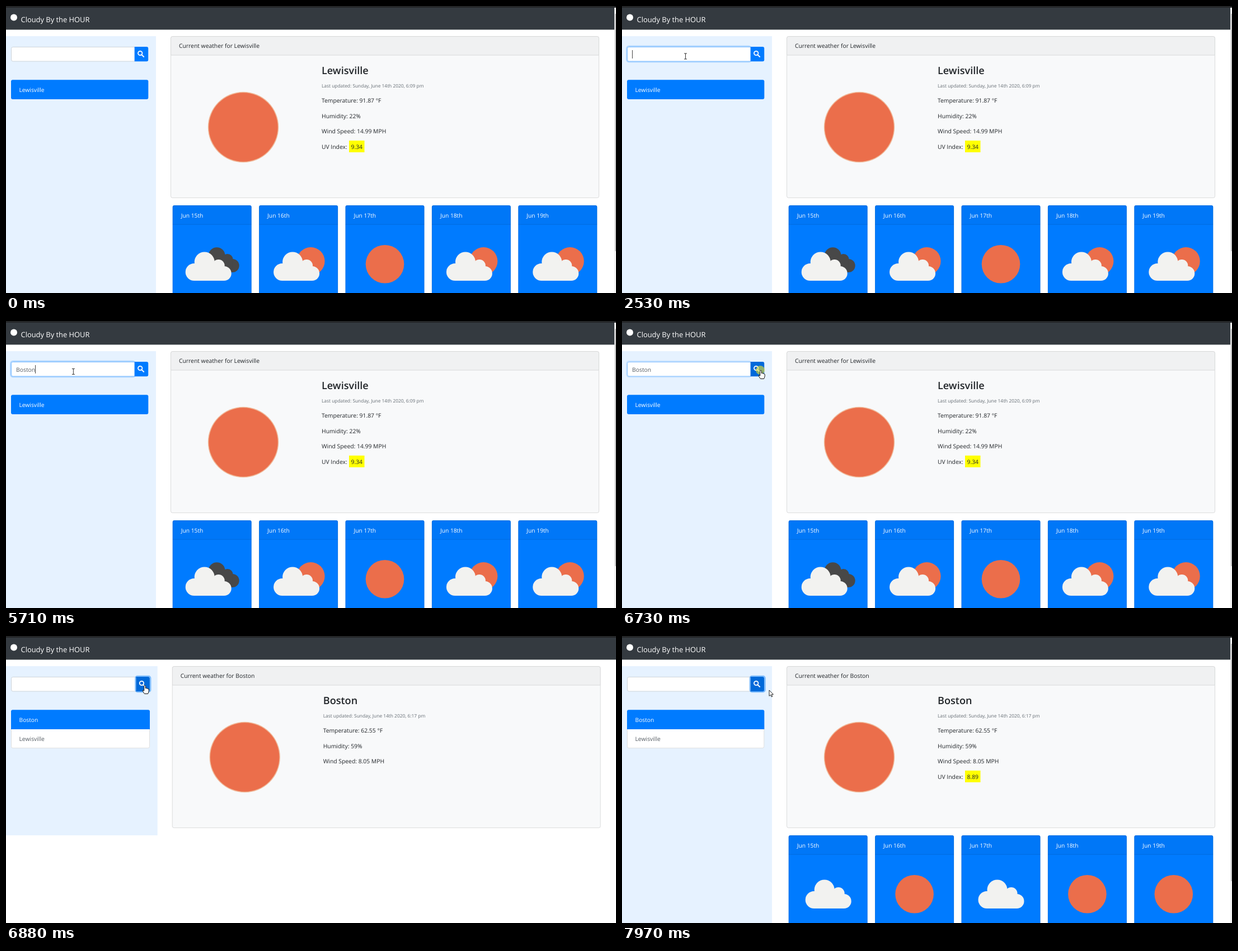
An HTML page with a canvas for the animation above (8 s loop, 1090x514 px).

```html
<!DOCTYPE html>
<html lang="en">
<head>
<meta charset="utf-8">
<title>Weather dashboard</title>
<style>
  html, body { margin: 0; width: 100%; height: 100%; overflow: hidden; background: #fff; }
  canvas { display: block; }
</style>
</head>
<body>
<canvas id="stage" width="1090" height="514"></canvas>
<script>
const LOOP = 8000;
const FONT = '"Open Sans", "Noto Sans", sans-serif';
const BLUE = '#007bff', SUN = '#eb6e4b', CLOUD = '#f2f2f0', LINE = 'rgba(0,0,0,.125)';
const ctx = document.getElementById('stage').getContext('2d');
ctx.textRendering = 'geometricPrecision';

// Page events
const CLICK = 6730, CLEARED = 6810, CURRENT = 6880, FORECAST = 6960, UV = 7040, ICONS = 7420;

const before = {
  city: 'Lewisville', time: '6:09 pm', temp: '91.87', humidity: 22, wind: '14.99', uv: '9.34',
  days: ['overcast', 'partly', 'sun', 'partly', 'partly']
};
const after = {
  city: 'Boston', time: '6:17 pm', temp: '62.55', humidity: 59, wind: '8.05', uv: '8.89',
  days: ['cloud', 'sun', 'cloud', 'sun', 'sun']
};
const pending = { 0: ['65.26', 56], 2: ['76.86', 33] };

// Pointer moves: start, end, number of steps, destination
const START = [906, 480];
const moves = [
  [210, 370, 3, 473, 254],
  [600, 980, 6, 99, 78],
  [1060, 1130, 2, 101, 83],
  [1990, 2070, 2, 107, 83],
  [2300, 2450, 3, 113.5, 90],
  [2680, 2680, 1, 113, 90.5],
  [5710, 6170, 7, 246, 91],
  [6250, 6330, 2, 248, 88],
  [7970, 7970, 1, 263, 97]
];
const keyTimes = [2680, 2910, 3080, 3310, 3380, 3610];
const caretSpans = [[1530, 2070], [2530, 4160], [4620, 5170], [5630, 6170]];

const within = (t, a, b) => t >= a && t < b;

function pointerAt(t) {
  let [x, y] = START;
  for (const [t0, t1, steps, tx, ty] of moves) {
    if (t < t0) break;
    const done = t >= t1 ? steps : 1 + Math.floor((t - t0) / (t1 - t0) * (steps - 1));
    let p = done / steps;
    if (steps > 3) p = p * p * (3 - 2 * p);
    x += (tx - x) * p;
    y += (ty - y) * p;
  }
  return { x, y };
}

function text(str, x, y, color = '#212529', size = 10.35, weight = 400) {
  ctx.font = `${weight} ${size}px ${FONT}`;
  ctx.fillStyle = color;
  ctx.fillText(str, x, y);
}

const whiteText = (str, x, y) => text(str, x, y, '#fff', 10.25, 500);

function rect(x, y, w, h, color) {
  ctx.fillStyle = color;
  ctx.fillRect(x, y, w, h);
}

function box(x, y, w, h, radius, fill, stroke, width = 1) {
  ctx.beginPath();
  ctx.roundRect(x, y, w, h, radius);
  if (fill) { ctx.fillStyle = fill; ctx.fill(); }
  if (stroke) { ctx.strokeStyle = stroke; ctx.lineWidth = width; ctx.stroke(); }
}

function disc(x, y, r, color) {
  ctx.beginPath();
  ctx.arc(x, y, r, 0, Math.PI * 2);
  ctx.fillStyle = color;
  ctx.fill();
}

function cloud(x, y) {
  disc(x + 15.5, y - 15.5, 15.5, CLOUD);
  disc(x + 34, y - 33.5, 18, CLOUD);
  disc(x + 59, y - 27, 11, CLOUD);
  disc(x + 69, y - 13, 13, CLOUD);
  rect(x + 15.5, y - 25, 53.5, 25, CLOUD);
}

const icons = {
  sun(x) { disc(x + 70.5, 462.3, 34.3, SUN); },
  cloud(x) { cloud(x + 30, 488); },
  partly(x) {
    disc(x + 92.5, 457, 25, SUN);
    cloud(x + 26, 492);
  },
  overcast(x) {
    const dark = '#484848';
    disc(x + 79, 447, 14.8, dark);
    disc(x + 98, 454, 10, dark);
    disc(x + 107, 465, 12, dark);
    rect(x + 79, 454, 28, 23, dark);
    cloud(x + 23, 492);
  }
};

function drawNavbar(scrollbar) {
  rect(0, 0, 1090, 42.4, '#343a40');
  rect(0, 0, 1090, 3, '#242628');
  disc(14, 20.5, 6, '#fff');
  text('Cloudy By the HOUR', 26.5, 28.5, '#fff', 12.9);
  if (scrollbar) {
    rect(1087, 3, 3, 511, '#f1f1f1');
    rect(1088, 14, 2, 425, '#c1c1c1');
  }
}

function drawSearch(t, x, hover) {
  const ring = within(t, 1610, CLICK) ? 0.25 : within(t, 1530, 1610) || within(t, CLICK, CLEARED) ? 0.13 : 0;
  if (ring) box(8.4, 71.9, x - 7.4, 28.2, 4, null, `rgba(0,123,255,${ring})`, 2.4);
  box(9.5, 73.5, x - 9, 25.5, [3, 0, 0, 3], '#fff', ring ? '#80bdff' : '#ced4da');

  const typed = t < CLEARED ? 'Boston'.slice(0, keyTimes.filter(k => t >= k).length) : '';
  text(typed, 18, 91, '#565d64');
  if (caretSpans.some(([a, b]) => within(t, a, b))) {
    const w = typed ? ctx.measureText(typed).width : 0;
    rect(Math.floor(18 + w), 79, 1, 15, '#444');
  }

  if (t >= CLEARED) box(x - 1.1, 71.9, 27, 28.2, 3.5, null, 'rgba(38,143,255,.55)', 2.2);
  box(x, 73, 24.5, 26.3, [0, 3, 3, 0], hover || t >= CLEARED ? '#0069d9' : BLUE);
  ctx.beginPath();
  ctx.arc(x + 10, 84.5, 3.7, 0, Math.PI * 2);
  ctx.moveTo(x + 12.8, 87.3);
  ctx.lineTo(x + 17, 91.5);
  ctx.strokeStyle = '#fff';
  ctx.lineWidth = 1.8;
  ctx.stroke();
}

function drawSidebar(t, grow, height, hover) {
  rect(0, 54, 268 + grow, height, '#e6f2ff');
  drawSearch(t, 229.7 + grow, hover);
  const width = 245.3 + grow;
  if (t < CLEARED) {
    box(9, 132.3, width, 34.6, 3, BLUE);
    whiteText('Lewisville', 23.5, 154);
  } else {
    box(9.5, 160.5, width - 1, 40.2, [0, 0, 3, 3], '#fff', '#dfdfdf');
    box(9, 132.3, width, 34.6, [3, 3, 0, 0], BLUE);
    whiteText('Boston', 23.5, 154);
    text('Lewisville', 23.5, 187.8, '#555c63');
  }
}

function drawCurrent(data, showUv) {
  box(294.5, 54.5, 765, 289, 3, '#f8f9fa');
  box(294.5, 54.5, 765, 33.5, [3, 3, 0, 0], '#f0f1f2');
  rect(295, 87.5, 764, 1, '#d9dadb');
  box(294.5, 54.5, 765, 289, 3, null, LINE);
  text('Current weather for ' + data.city, 309, 75);
  disc(424, 217, 63.2, '#f0b898');
  disc(424, 217, 61.7, SUN);
  text(data.city, 564, 121.5, '#212529', 18.1, 600);
  text(`Last updated: Sunday, June 14th 2020, ${data.time}`, 564, 145.5, '#666e75', 8.4);
  text(`Temperature: ${data.temp} °F`, 564, 173);
  text(`Humidity: ${data.humidity}%`, 564, 200.7);
  text(`Wind Speed: ${data.wind} MPH`, 564, 228.2);
  if (showUv) {
    text('UV Index:', 564, 255.8);
    rect(613, 241, 27.5, 21, '#ff0');
    text(data.uv, 616.5, 255.8);
  }
}

function drawForecast(data, iconsReady) {
  data.days.forEach((kind, i) => {
    const x = 297.7 + 154.4 * i;
    const waiting = !iconsReady && pending[i];
    const height = waiting ? 107.3 : 170;
    box(x, 357, 141, height, 3, BLUE);
    box(x, 357, 141, 34, [3, 3, 0, 0], 'rgba(0,0,0,.03)');
    box(x + 0.4, 357.4, 140.2, height - 0.8, 3, null, LINE, 0.8);
    rect(x, 390.7, 141, 1, LINE);
    whiteText(`Jun ${15 + i}th`, x + 15, 378.7);
    if (waiting) {
      whiteText(`Temp: ${waiting[0]} °F`, x + 15, 418);
      whiteText(`Humidity: ${waiting[1]}%`, x + 15, 445.5);
    } else {
      icons[kind](x);
    }
  });
}

function outline(path, x, y, width) {
  ctx.save();
  ctx.translate(x, y);
  ctx.fillStyle = '#fff';
  ctx.strokeStyle = '#111';
  ctx.lineWidth = width;
  ctx.lineJoin = 'round';
  ctx.fill(path);
  ctx.stroke(path);
  ctx.restore();
}

const arrow = new Path2D('M0 0V10.5L2.5 8.3L4.2 12L5.8 11.3L4.2 7.7H7.4Z');
const hand = new Path2D('M-1.3 .8Q0 -1.2 1.3 .8V5Q3 4.3 3.7 5.5Q5.3 5 5.8 6.3Q7.2 6.1 7.2 7.6V10.5L5.6 15H-.6L-4 9.6Q-3.8 7.7-1.3 9.6Z');

function drawPointer(t, { x, y }, overInput, overButton) {
  if (t < 210) return;
  if (within(t, 1360, 1610)) disc(x - 1, y, 8, `rgba(250,232,20,${within(t, 1440, 1530) ? 0.7 : 0.4})`);
  if (within(t, CLICK, CLEARED)) disc(x - 1, y, 8, 'rgba(240,225,40,.6)');
  if (overButton) {
    outline(hand, x, y + 0.5, 1);
  } else if (overInput) {
    rect(x - 0.5, y - 5, 1, 10, '#333');
    rect(x - 2.5, y - 5.5, 5, 1, '#333');
    rect(x - 2.5, y + 4.5, 5, 1, '#333');
  } else {
    outline(arrow, x, y, 0.9);
  }
}

function render(t) {
  const hasCurrent = !within(t, CLEARED, CURRENT);
  const hasForecast = !within(t, CLEARED, FORECAST);
  // The page widens while it is too short to need a scrollbar
  const grow = hasForecast ? 0 : 2.7;
  const sidebarHeight = hasForecast ? 460 : hasCurrent ? 303 : 160;
  const pointer = pointerAt(t);
  const level = pointer.y >= 73 && pointer.y < 100;
  const overInput = level && pointer.x >= 9 && pointer.x < 230;
  const overButton = level && pointer.x >= 230 && pointer.x < 256;
  const data = t < CLEARED ? before : after;

  rect(0, 0, 1090, 514, '#fff');
  drawNavbar(hasForecast);
  drawSidebar(t, grow, sidebarHeight, overButton);
  if (hasCurrent) {
    ctx.save();
    ctx.translate(grow, 0);
    drawCurrent(data, t < CLEARED || t >= UV);
    ctx.restore();
  }
  if (hasForecast) drawForecast(data, t < CLEARED || t >= ICONS);
  drawPointer(t, pointer, overInput, overButton);
}

const begin = performance.now();
function tick() {
  render((performance.now() - begin) % LOOP);
  requestAnimationFrame(tick);
}
tick();
</script>
</body>
</html>
```
